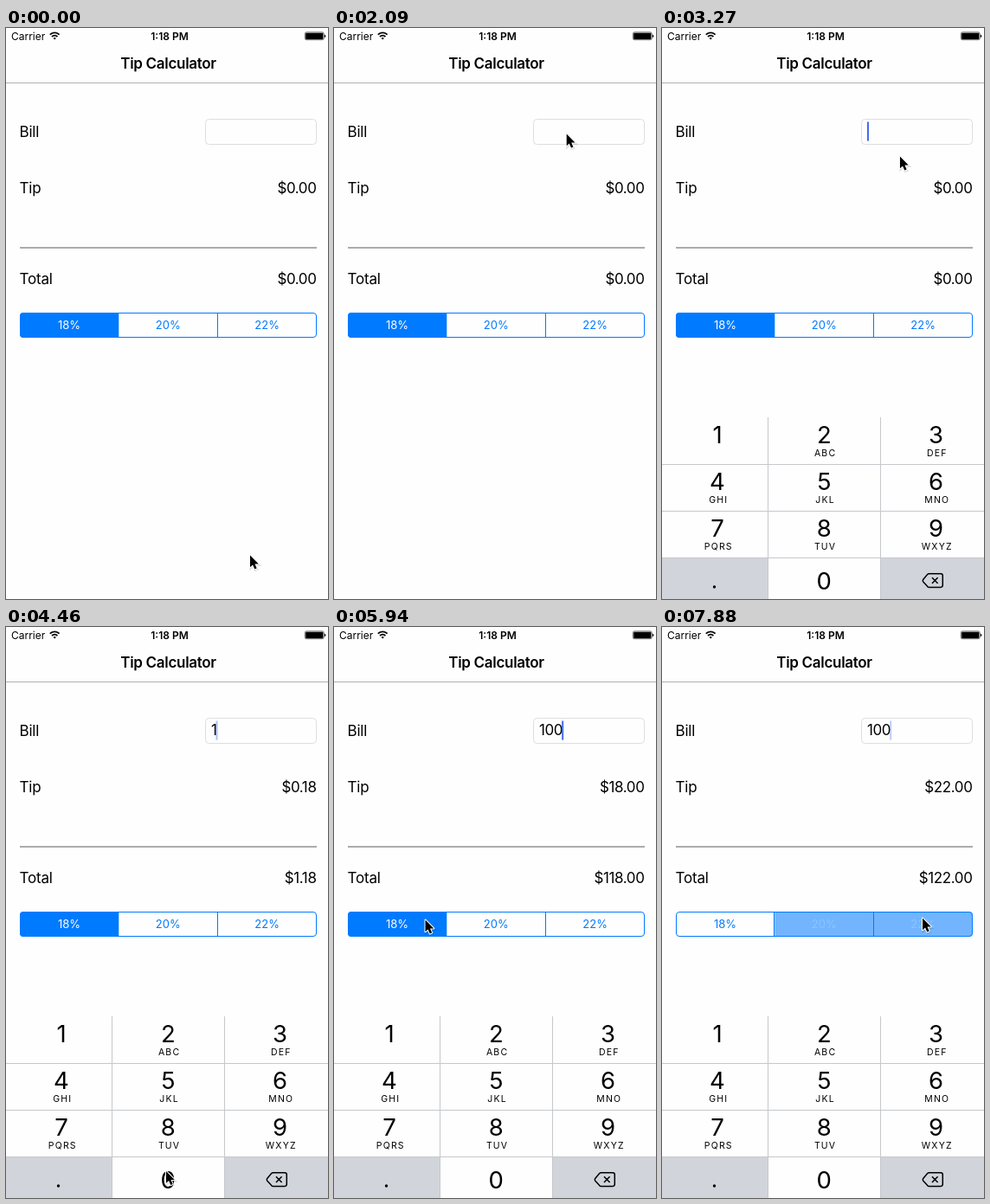
Recreate the animation shown at these times as an HTML page. Size 372x660 px, loop 8 s.

```html
<!DOCTYPE html>
<html lang="en">
<head>
<meta charset="utf-8">
<title>Tip Calculator</title>
<style>
  html, body { margin: 0; width: 100%; height: 100%; overflow: hidden; background: #fefefe; }
  svg { display: block; width: 100%; height: 100%; }
  text { font-family: Inter, Roboto, sans-serif; font-size: 17px; letter-spacing: -.4px; }
  .mid { text-anchor: middle; }
  .end { text-anchor: end; }
  .label { letter-spacing: -.2px; }
  .title { font-weight: 600; letter-spacing: -.3px; }
  .status { font-size: 12px; letter-spacing: 0; }
  .bold { font-weight: 600; }
  .segment { font-size: 13px; letter-spacing: 0; }
  .digit { font-size: 27.5px; letter-spacing: 0; }
  .letters { font-size: 10.5px; letter-spacing: 1.2px; }
</style>
</head>
<body>
<svg viewBox="0 0 372 660">
  <defs>
    <clipPath id="pill"><rect x="16" y="329" width="343" height="29" rx="4"/></clipPath>
    <path id="arrow" d="M0 0V13.8L3.1 10.9L5.3 16L7.7 15L5.5 10H9.8Z"/>
  </defs>
  <rect width="372" height="660" fill="#fefefe"/>

  <text class="status" x="6" y="14">Carrier</text>
  <g fill="none" stroke="#000" stroke-width="1.8">
    <path d="M50.8 7.6a7.6 7.6 0 0 1 10.8 0M53 10a4.5 4.5 0 0 1 6.4 0"/>
    <path d="M56.2 13.6l-1.6-1.8a2.3 2.3 0 0 1 3.2 0z" fill="#000" stroke="none"/>
  </g>
  <text class="status bold mid" x="189" y="14">1:18 PM</text>
  <rect x="345.4" y="4.9" width="21.8" height="8.8" rx="1.8" fill="none" stroke="#000" stroke-width=".6"/>
  <rect x="346.2" y="5.7" width="20.2" height="7.2" rx="1"/>
  <path d="M368 7.8v3.2q1.3-.4 1.3-1.6T368 7.8z"/>
  <text class="title mid" x="187.5" y="47">Tip Calculator</text>
  <path d="M0 63.5H372" stroke="#b0b0b0"/>

  <text class="label" x="15.5" y="126">Bill</text>
  <rect x="230.5" y="105.5" width="128" height="29" rx="4" fill="#fefefe" stroke="#dedede"/>
  <text id="bill" x="237" y="125"></text>
  <rect id="caret" y="108.5" width="2" height="22" fill="#426bf2"/>
  <text class="label" x="15.5" y="191">Tip</text>
  <text id="tip" class="end" x="358.5" y="191"></text>
  <path d="M16 254H359" stroke="#adabad" stroke-width="2"/>
  <text class="label" x="15.5" y="296">Total</text>
  <text id="total" class="end" x="358.5" y="296"></text>

  <g id="segments" clip-path="url(#pill)"></g>
  <g fill="none" stroke="#007aff">
    <rect x="16.5" y="329.5" width="342" height="28" rx="3.5"/>
    <path d="M129.5 329V358M244.5 329V358"/>
  </g>

  <g id="keyboard">
    <rect y="450" width="372" height="210" fill="#fefefe"/>
    <path d="M0 613H122V660H0zM253 613H372V660H253z" fill="#d1d5db"/>
    <rect id="zeroKey" x="123" y="613" width="129" height="47" fill="#d1d5db"/>
    <path d="M122.5 450V660M252.5 450V660M0 504.5H372M0 558.5H372M0 612.5H372" stroke="#c5c8cc" fill="none"/>
    <g id="keys"></g>
    <circle cx="60.5" cy="646" r="1.7"/>
    <path d="M308.5 630.8H322q2.3 0 2.3 2.3v11q0 2.3-2.3 2.3H308.5q-1 0-1.8-.8l-5-5.6q-1-1.2 0-2.4l5-6q.8-.8 1.8-.8zM312 635.2l6.6 6.8M318.6 635.2l-6.6 6.8" fill="none" stroke="#000" stroke-width="1.5"/>
  </g>

  <g id="cursor">
    <use href="#arrow" x=".6" y="1.2" fill="none" stroke="#000" stroke-opacity=".12" stroke-width="2.5"/>
    <use href="#arrow" stroke="#fff" stroke-width="2" paint-order="stroke" stroke-linejoin="round"/>
  </g>
</svg>
<script>
const LOOP = 8000;
const STEP = 148.5; // the screen refreshes in held steps
const $ = id => document.getElementById(id);
const clamp = v => Math.min(1, Math.max(0, v));
const smooth = u => u * u * (3 - 2 * u);

function add(parent, tag, attrs, text = '') {
  const node = document.createElementNS('http://www.w3.org/2000/svg', tag);
  for (const name in attrs) node.setAttribute(name, attrs[name]);
  node.textContent = text;
  return parent.appendChild(node);
}

const rates = [18, 20, 22];
const segments = rates.map((rate, i) => {
  const x = 16 + 114.3 * i;
  return {
    fill: add($('segments'), 'rect', { x, y: 329, width: 114.3, height: 29, fill: '#007aff' }),
    text: add($('segments'), 'text', { x: x + 57, y: 348, class: 'segment mid' }, rate + '%')
  };
});

const columns = [64, 187.3, 316.5];
['', 'ABC', 'DEF', 'GHI', 'JKL', 'MNO', 'PQRS', 'TUV', 'WXYZ'].forEach((letters, i) => {
  const x = columns[i % 3], y = 480 + 54 * Math.floor(i / 3);
  add($('keys'), 'text', { x, y, class: 'digit mid' }, i + 1);
  add($('keys'), 'text', { x: x + 1.3, y: y + 15, class: 'letters mid' }, letters);
});
add($('keys'), 'text', { x: columns[1], y: 649, class: 'digit mid' }, '0');

// Pointer moves: first and last step, destination, optional bend
const origin = [282, 609.5];
const moves = [
  { from: 0, to: 14, end: [268.7, 122.5], bend: [50, 250] },   // bill field
  { from: 21, to: 26, end: [83, 470], bend: [313, 242] },      // key 1
  { from: 27, to: 30, end: [185, 629] },                       // key 0
  { from: 34, to: 38, end: [105.5, 338.5] },                   // 18%
  { from: 40, to: 44, end: [181, 341] },                       // 20%
  { from: 45, to: 48, end: [301, 336.5] }                      // 22%
];

function pointer(step) {
  let at = origin;
  for (const { from, to, end, bend } of moves) {
    const e = smooth(clamp((step - from) / (to - from)));
    at = at.map((start, i) => {
      const middle = bend ? bend[i] : (start + end[i]) / 2;
      return (1 - e) ** 2 * start + 2 * e * (1 - e) * middle + e * e * end[i];
    });
  }
  return at;
}

const FOCUS = 17;                      // step at which the keyboard opens
const typed = [3935, 4600, 4900];      // keystroke times in ms
const taps = [44, 53];                 // steps at which the next rate is chosen

// Blinks once a second, restarting at every keystroke.
function caretOpacity(time, count) {
  const phase = (time - (count ? typed[count - 1] : 2250)) % 1000;
  return phase < 700 ? clamp((580 - phase) / 140) : clamp((phase - 950) / 60);
}

function draw(step) {
  const time = step * STEP;
  const count = typed.filter(t => t <= time).length;
  const choice = taps.filter(s => s <= step).length;
  const fading = taps.includes(step);
  const bill = '100'.slice(0, count);
  const tip = bill * rates[choice] / 100;

  $('bill').textContent = bill;
  $('tip').textContent = '$' + tip.toFixed(2);
  $('total').textContent = '$' + (+bill + tip).toFixed(2);
  $('caret').setAttribute('x', 237 + $('bill').getComputedTextLength() - (count ? 1 : 0));
  $('caret').setAttribute('opacity', step < FOCUS ? 0 : caretOpacity(time, count));

  segments.forEach(({ fill, text }, i) => {
    const involved = i === choice || i === choice - 1;
    const on = fading && involved ? .55 : +(i === choice);
    fill.setAttribute('fill-opacity', on);
    text.setAttribute('fill', `rgb(${255 * on},${122 + 133 * on},255)`);
  });

  const drop = 210 * (1 - clamp((step - FOCUS + 1) / 4)) ** 2;
  $('keyboard').setAttribute('transform', `translate(0 ${drop})`);
  $('zeroKey').setAttribute('opacity', +(count === 2 && time - typed[1] < STEP));
  $('cursor').setAttribute('transform', `translate(${pointer(step)})`);
}

const begin = performance.now();
function tick() {
  const time = (performance.now() - begin) % LOOP;
  draw(Math.floor((time + 5) / STEP));
  requestAnimationFrame(tick);
}
tick();
</script>
</body>
</html>
```
